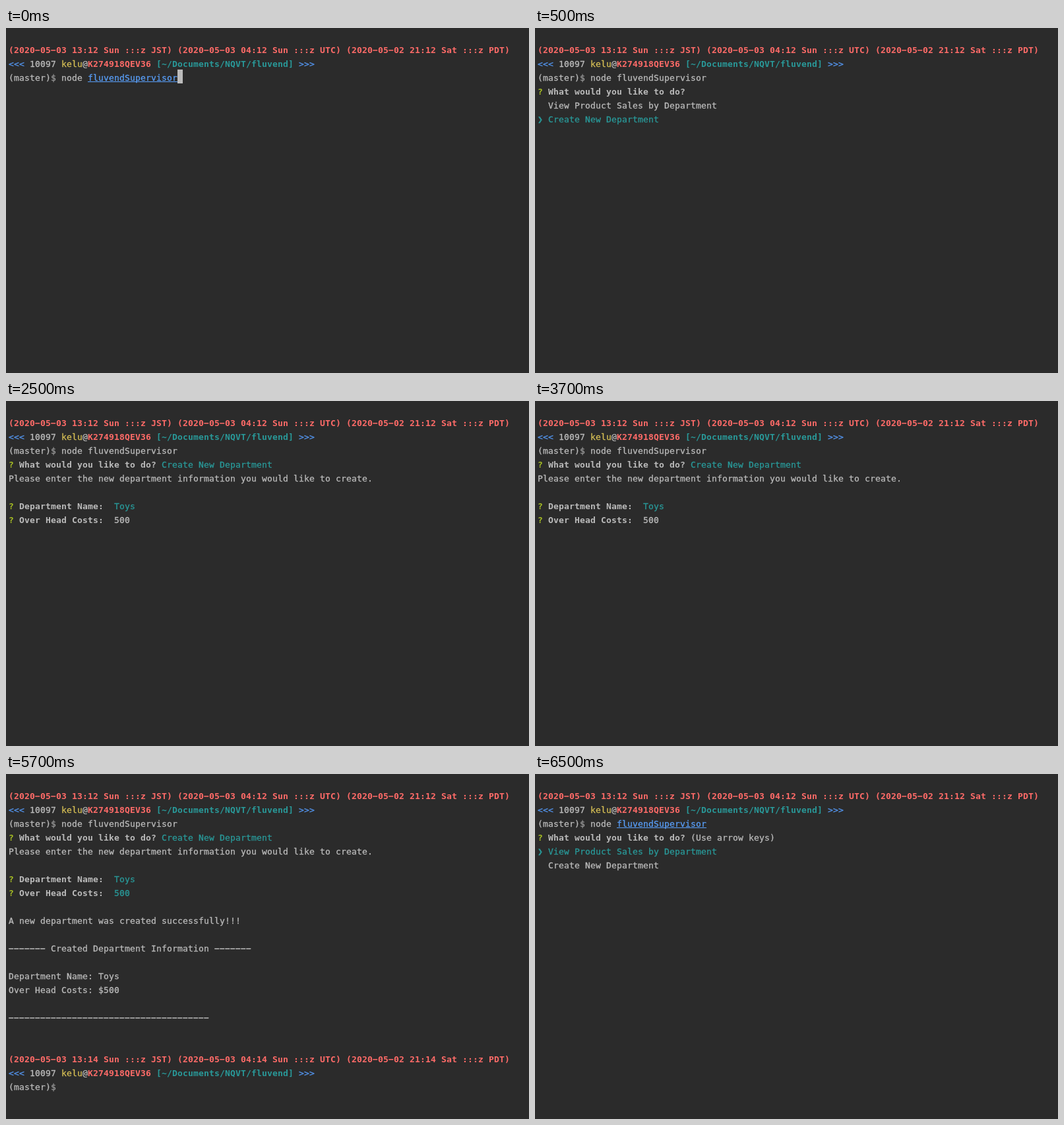
Recreate the animation shown at these times as an HTML page. Size 793 by 523 pixels, loop 8000 ms.

```html
<!DOCTYPE html>
<html lang="en">
<head>
<meta charset="utf-8">
<title>Terminal session</title>
<style>
  html, body { margin: 0; width: 100%; height: 100%; overflow: hidden; background: #2b2b2b; }
  #screen {
    position: absolute; left: 4px; top: 23px;
    font: 13px/21px "DejaVu Sans Mono", monospace;
    letter-spacing: calc(8px - 1ch);
    color: #bbb; white-space: pre;
    -webkit-text-stroke: .3px;
  }
  #screen div { height: 21px; }
  b { font-weight: bold; -webkit-text-stroke: 0; }
  .red { color: #ff6b68; }
  .blue { color: #5394ec; }
  .cyan { color: #299999; }
  .green { color: #a8c023; }
  .yellow { color: #d6bf55; }
  .dim { color: #999; }
  .link { color: #589df6; text-decoration: underline 1px; text-underline-offset: 1px; text-decoration-skip-ink: none; }
  #cursor { position: absolute; left: 260px; top: 63px; width: 8px; height: 21px; background: #bbb; }
</style>
</head>
<body>
<div id="screen"></div>
<div id="cursor"></div>
<script>
const span = (color, text) => `<span class="${color}">${text}</span>`;
const bold = (color, text) => `<b class="${color}">${text}</b>`;
const dash = n => "\u2212".repeat(n);

const app = "fluvendSupervisor";
const stamp = (day, time, name, zone) =>
  `(2020${dash(1)}05${dash(1)}${day} ${time} ${name} :::z ${zone})`;

const prompt = min => [
  bold("red", [
    stamp("03", "13:" + min, "Sun", "JST"),
    stamp("03", "04:" + min, "Sun", "UTC"),
    stamp("02", "21:" + min, "Sat", "PDT")
  ].join(" ")),
  span("blue", "&lt;&lt;&lt;") + " 10097 " + span("yellow", "kelu") + "@" +
    bold("red", "K274918QEV36") + " " +
    bold("cyan", "[~/Documents/NQVT/fluvend]") + " " + span("blue", "&gt;&gt;&gt;"),
  "(master)" + span("dim", "$")
];

const command = name => {
  const rows = prompt("12");
  rows[2] += " node " + name;
  return rows;
};
const ask = (label, answer = "") => bold("green", "?") + " " + bold("", label) + answer;
const pick = text => span("cyan", "❯ " + text);

const question = "What would you like to do?";
const view = "View Product Sales by Department";
const create = "Create New Department";
const link = span("link", app);

const form = cost => [
  ...command(app),
  ask(question, " " + span("cyan", create)),
  "Please enter the new department information you would like to create.",
  "",
  ask("Department Name:", "  " + span("cyan", "Toys")),
  ask("Over Head Costs:", "  " + cost)
];

// Each scene: start time in ms, then its rows
const scenes = [
  [0, command(link)],
  [500, [...command(app), ask(question), "  " + view, pick(create)]],
  [2500, form("500")],
  [4500, [
    ...form(span("cyan", "500")),
    "",
    "A new department was created successfully!!!",
    "",
    `${dash(7)} Created Department Information ${dash(7)}`,
    "",
    "Department Name: Toys",
    "Over Head Costs: $500",
    "",
    dash(38),
    "", "",
    ...prompt("14")
  ]],
  [6500, [...command(link), ask(question, " (Use arrow keys)"), pick(view), "  " + create]]
];

const screenBox = document.getElementById("screen");
const cursor = document.getElementById("cursor");
const start = performance.now();
let shown = -1;

function draw() {
  const t = Math.max(0, performance.now() - start) % 8000;
  const now = scenes.findLastIndex(([from]) => t >= from);
  if (now !== shown) {
    shown = now;
    screenBox.innerHTML = scenes[now][1].map(row => `<div>${row}</div>`).join("");
    cursor.hidden = now !== 0;
  }
  requestAnimationFrame(draw);
}
draw();
</script>
</body>
</html>
```
